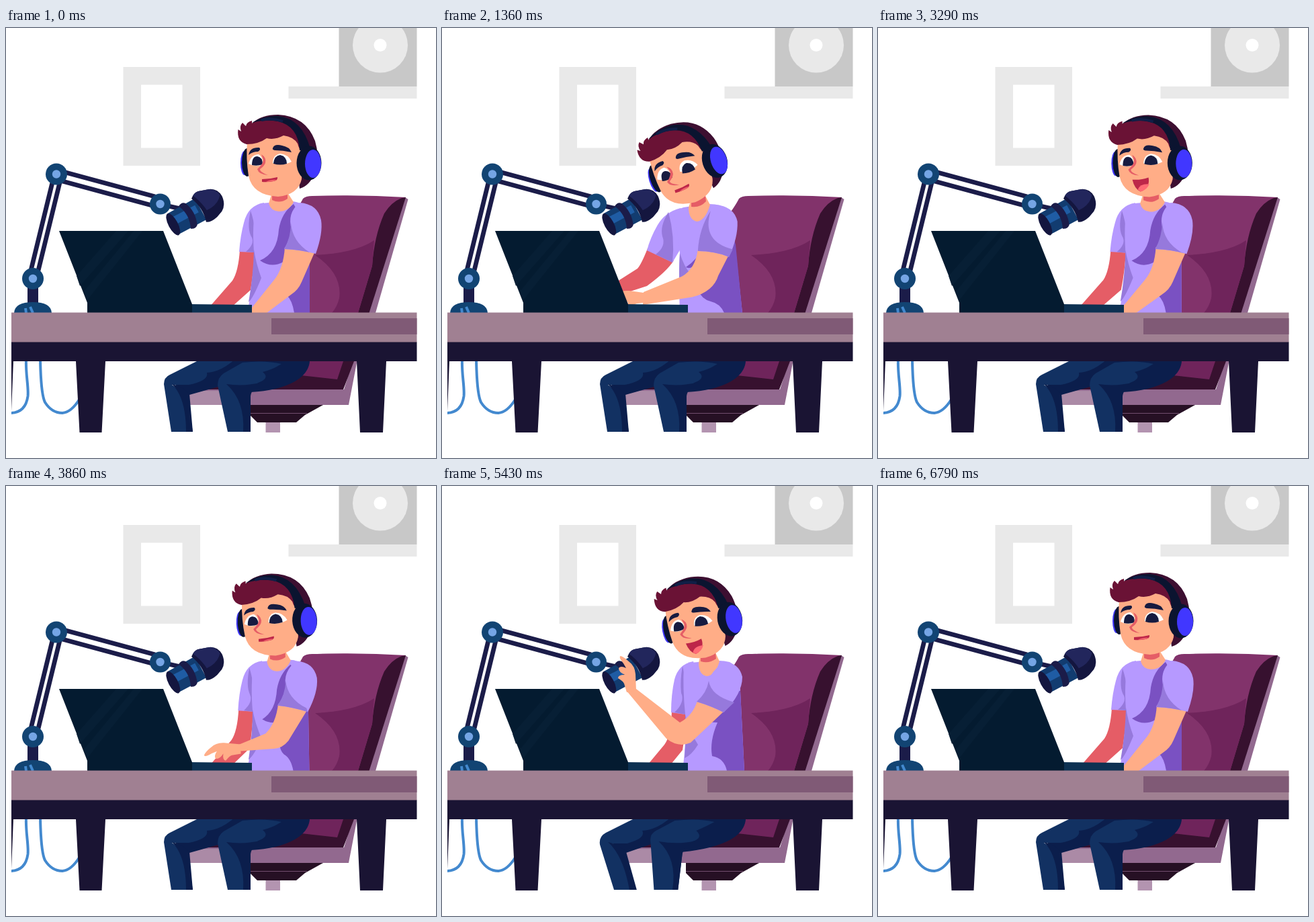
An HTML page that plays this animation: 640 by 640 pixels, repeating every 7.21 s.

```html
<!DOCTYPE html>
<html lang="en">
<head>
<meta charset="utf-8">
<title>Podcast host</title>
<style>
html, body { margin: 0; width: 100%; height: 100%; overflow: hidden; background: #fff; }
svg { display: block; width: 100vw; height: 100vh; }
</style>
</head>
<body>
<svg viewBox="0 0 640 640">
  <clipPath id="room"><path d="M8 0H611.500V640H8Z"/></clipPath>
  <g clip-path="url(#room)">
    <!-- wall -->
    <g fill="#e9e9e9">
      <path fill-rule="evenodd" d="M174.500 58H289V205H174.500ZM201 84.500V178.500H262.500V84.500Z"/>
      <path d="M420.500 87H612V105H420.500Z"/>
      <path fill="#c8c8c8" d="M495.500 0H612V87H495.500Z"/>
      <circle cx="557" cy="25.500" r="41"/>
      <circle cx="557" cy="25.500" r="9.500" fill="#fff"/>
    </g>

    <!-- chair -->
    <path fill="#92698f" d="M594 252L598.500 255L550 424H530Z"/>
    <path fill="#37112f" d="M560 252L595 252L540.500 424H510Z"/>
    <path fill="#82336b" d="M420 424L418 290Q436 266 442 254Q446 250 456 250Q525 248 595 252Q577 254 563 276Q548 310 545 354L524 424Z"/>
    <path fill="#6f245b" d="M548 316Q520 335 460 338Q501 366 496 402Q493 415 485 424H524L545 354Z"/>
    <path fill="#92698f" d="M280 538H503L516 496H522.500L510 561H268Z"/>
    <path fill="#ab8aa6" d="M272 540H330V561H268Z"/>
    <path fill="#37112f" d="M300 496H518L502 538H290Z"/>
    <path fill="#6f245b" d="M430 516L493 523L502 496H440Z"/>
    <path fill="#261024" d="M363 561H472L445 576L432 587H374L363 576Z"/>
    <path fill="none" stroke="#92698f" stroke-width=".7" d="M363 573.500H448"/>
    <path fill="#b394b0" d="M386.500 587H408V602H386.500Z"/>

    <!-- cables -->
    <g fill="none" stroke="#4389cf" stroke-width="4">
      <path d="M30 494C29 515 34 535 32.500 548Q29 573 6 573"/>
      <path d="M51 494Q52 545 58 557Q68 573 84 573Q97 572 109 553"/>
    </g>

    <!-- microphone -->
    <g fill="none" stroke="#1b1c49" stroke-width="6.800">
      <path d="M87 214.500L222 251M84 228L217 264M69 230L37 361M80 230L48 361M242 265L264 270"/>
      <path stroke-width="16" d="M40 384V410"/>
    </g>
    <g fill="#124473">
      <path d="M12 424Q13 408 40 408Q67 408 68 424Z"/>
      <circle cx="75" cy="217.500" r="16"/>
      <circle cx="229.500" cy="262" r="15.500"/>
      <circle cx="40" cy="373" r="16"/>
    </g>
    <g fill="#75a5e5">
      <circle cx="75" cy="217.500" r="6.200"/>
      <circle cx="229.500" cy="262" r="6.200"/>
      <circle cx="40" cy="373" r="6.200"/>
    </g>
    <path fill="none" stroke="#4389cf" stroke-width="4" d="M30 424L29 417M40 424L36 415"/>
    <g transform="translate(281 274) rotate(-28)">
      <path fill="#123c70" d="M-37 -17L10 -18V18L-37 18Z"/>
      <path fill="#1f5ca4" d="M-37 -9H5V3H-37Z"/>
      <path fill="#1b1c49" d="M-17 -19Q-10 -23 -6 -18Q2 0 -6 19Q-11 23 -17 19Q-8 0 -17 -19Z"/>
      <path fill="#14163f" d="M5 -20Q12 -26 19 -25L32 -21Q46 -17 47 -2Q46 12 36 18L26 22Q14 25 8 21Q14 0 5 -20Z"/>
      <path fill="#22265c" d="M9 -23Q14 -26 19 -25L32 -21Q43 -18 45 -5Q36 7 17 6Q16 -8 9 -23Z"/>
      <ellipse cx="-37" cy="1" rx="7" ry="18" fill="#14163f"/>
    </g>

    <g id="legs"></g>
    <g id="person"></g>

    <g id="head">
      <ellipse cx="355" cy="201" rx="6" ry="18" fill="#4137ff"/>
      <ellipse cx="359" cy="200" rx="8" ry="21" fill="#0b1430"/>
      <path fill="#3d0f31" d="M366 142Q380 129 405 129Q446 131 460 168Q467 190 460 215Q452 235 437 239L430 180Z"/>
      <path fill="#ffad87" d="M359 168Q357 195 361 220Q367 249 405 251Q435 248 440 225L442 180Q430 150 400 152Q375 150 359 168Z"/>
      <path fill="#6a1235" d="M358 173Q343 169 345.500 151L350 154Q347 146 352 141L357 146Q358 140 366 138V142Q385 131 408 133Q432 138 440 160L441 185Q436 180 434 172Q428 162 413 160Q400 167 388 164Q376 173 358 173Z"/>
      <path fill="#0b1430" d="M366 141Q384 130 405 131Q441 135 453 180L437 182Q435 146 405 139Q386 135 366 141Z"/>
      <path fill="none" stroke="#101f47" stroke-width="4" d="M380 137Q396 133 412 139"/>
      <ellipse cx="451" cy="201" rx="18.500" ry="25.500" fill="#0b1430"/>
      <ellipse cx="457" cy="202" rx="12" ry="21" fill="#4137ff"/>
      <g fill="#fff">
        <path d="M361 202Q365 188 376 188Q383 192 382 203Q372 208 361 202Z"/>
        <path d="M397 201Q397 189 408 187Q420 188 425 199Q412 206 397 201Z"/>
      </g>
      <g fill="#171b40">
        <g id="pupils">
          <path d="M366 204Q366 191 374 191Q382 192 382 203Q374 206 366 204Z"/>
          <path d="M398 202Q399 190 408 189Q418 191 418 202Q408 205 398 202Z"/>
        </g>
        <path d="M361 189Q363 177 377 178Q380 181 375 184Q367 184 361 189Z"/>
        <path d="M397 179Q399 172 411 175Q422 177 425 185Q412 182 400 182Q396 181 397 179Z"/>
      </g>
      <path fill="#e55d66" d="M380 188Q388 193 386 201Q384 206 378 210Q377 214 390 219Q376 218 374 210Q383 202 383 196Z"/>
      <g id="closed">
        <path fill="#bd2649" d="M381 225Q393 225 404 222Q405 227 398 228Q389 230 381 229Z"/>
        <path fill="#f0626c" d="M387 229Q394 225 403 226Q399 229 387 229Z"/>
      </g>
      <g id="open">
        <path fill="#bd2649" d="M380 225Q393 226 404 222Q407 237 392 243Q383 239 380 225Z"/>
        <path fill="#ff6b75" d="M388 240Q391 231 405 232Q402 240 392 243Z"/>
      </g>
    </g>

    <!-- laptop -->
    <path fill="#0d3152" d="M270 411L366 412V424H270Z"/>
    <path fill="#041b30" d="M79 302H234L277 411V424H121V409Z"/>
    <path fill="#071f35" d="M164 302H182L110 384L105 369ZM190 302H203L121 405L116 392Z"/>

    <!-- desk -->
    <path fill="#a08092" d="M8 423.500H612V468H8Z"/>
    <path fill="#805a76" d="M395 432H612V456H395Z"/>
    <path fill="#1a1433" d="M8 467.500H612V496H8ZM104 496H148L142.500 602H109.500ZM522 496H566L561 602H527ZM8 496H11L8 570Z"/>
  </g>
</svg>
<script>
const LOOP = 7210, STEP = 1000 / 14;
const SKIN = '#ffad87', RED = '#e55d66', LILAC = '#b699ff', SHADE = '#9679dc', VIOLET = '#7a51c2';
const NAVY = '#0b1e4c', DENIM = '#123162';

// Each part: fill and one outline per pose. The typing pose falls back to lean.
const body = [
  [RED, { // far arm
    rest: 'M348 330L370 330Q369 360 364 390L336 415L303 415L337 376Q346 362 348 330',
    lean: 'M306 328L345 346Q335 362 305 384L268 396L258 379L291 358Q297 351 306 328',
    hold: 'M342 334L363 338Q362 370 358 393L340 415L306 415L331 385Q341 372 342 334' }],
  [LILAC, { // far sleeve
    rest: 'M384 260Q360 264 354 290Q349 308 347 333L369 334L392 300Z',
    lean: 'M355 268Q332 274 321 293Q310 312 305 331L343 349L372 300Z',
    hold: 'M374 261Q352 265 346 288Q341 310 341 337L362 340L385 300Z' }],
  [SHADE, {
    rest: 'M364 272Q374 300 369 334L357 333Q370 322 366 312Q358 300 364 272',
    lean: 'M337 274Q347 310 343 349L318 337Q334 325 328 310Q324 295 337 274',
    hold: 'M358 268Q366 300 362 340L346 337Q362 322 356 308Q354 290 358 268' }],
  [LILAC, { // torso
    rest: 'M392 260Q378 260 372 268Q366 290 369 334Q373 370 358 424L452 424L452 330Q455 270 440 262Q432 258 424 258Z',
    lean: 'M366 266Q352 267 346 276Q350 300 354 335Q352 370 354 424L447 424L436 322Q432 275 414 264Q406 262 398 262Z',
    hold: 'M382 262Q368 262 360 268Q358 300 362 340Q364 380 358 424L450 424L444 305Q445 270 428 262Q420 260 412 260Z' }],
  [VIOLET, {
    rest: 'M452 330L452 424L429 424Q426 405 418 398Q402 390 413 348Q395 358 378 346Q404 335 406 300Q410 275 428 262L450 300Z',
    lean: 'M437 322L447 424L420 424Q414 410 400 407Q372 400 380 350Q370 360 363 356Q380 345 388 326Q394 300 406 280L430 300Z',
    hold: 'M444 305L450 424L424 424Q420 405 402 402Q398 380 410 352Q400 352 390 350Q395 335 396 310Q400 290 412 275L430 300Z' }],
  [SHADE, {
    rest: 'M369 330Q368 370 361 408Q368 402 380 372Q372 350 369 330',
    lean: 'M354 335Q352 370 354 388Q364 378 370 366Q360 355 354 335',
    hold: 'M362 340Q364 370 361 405Q372 400 381 385Q368 365 362 340' }],
  [SKIN, { // neck
    rest: 'M396 245L419 245L428 259Q421 273 406 273Q394 272 391 261Z',
    lean: 'M371 255L392 250L399 263Q392 287 379 288Q367 285 367 267Z',
    hold: 'M385 250L407 248L413 261Q407 282 394 283Q382 281 382 263Z' }],
  [RED, {
    rest: 'M396 245L419 245L419 254Q408 262 396 256Z',
    lean: 'M371 255L392 250L393 258Q384 268 371 266Z',
    hold: 'M385 250L407 248L408 257Q397 265 385 261Z' }],
  [SKIN, { // near arm
    rest: 'M415 326Q413 358 399 375L363 420L380 430L424 397Q435 390 440 378L461 330',
    lean: 'M378 328Q374 356 355 367L300 391L299 412L375 395Q400 390 407 374L420 336',
    type: 'M382 331Q378 360 358 371L300 394L299 412L371 403Q406 393 413 366L430 338',
    hold: 'M380 320Q373 342 354 352L289 302L274 304L334 376Q352 390 370 382L420 335' }],
  [LILAC, { // near sleeve
    rest: 'M437 260Q418 275 425 300Q421 318 414 329Q438 330 461 336Q472 305 469 286Q464 262 437 260',
    lean: 'M406 263Q386 280 393 300Q386 318 378 330Q402 332 420 340Q440 312 439 288Q434 265 406 263',
    type: 'M406 263Q386 280 394 300Q388 318 382 333Q406 332 430 341Q441 312 440 288Q435 265 406 263',
    hold: 'M420 262Q394 280 396 300Q390 312 379 321Q402 328 419 337Q447 310 447 284Q442 263 420 262' }],
  [SHADE, {
    rest: 'M424 290Q426 318 452 334L461 336Q438 330 414 329Q424 312 424 290',
    lean: 'M400 272Q384 316 430 326L420 340Q402 332 378 330Q382 298 400 272',
    type: 'M400 272Q386 318 434 331L430 341Q406 332 382 333Q383 298 400 272',
    hold: 'M397 290Q400 312 435 322L419 337Q402 328 379 321Q394 308 397 290' }],
];
const legs = [
  [NAVY, { // thighs
    rest: 'M300 490L452 490Q454 512 430 526Q405 540 364 542L330 530L273 546L242 524Z',
    out: 'M300 490L452 490Q454 512 430 526Q405 540 357 545L325 528L274 546L242 524Z' }],
  [DENIM, { // far leg
    rest: 'M292 492L342 492Q320 512 299 513Q302 525 272 531L247 531Q270 545 278 601L246 601L235 530Q235 520 244 516Z',
    out: 'M292 492L342 492Q320 512 298 513Q304 524 276 532L250 532Q272 548 290 601L257 601L235 534Q233 522 244 516Z' }],
  [NAVY, {
    rest: 'M247 530Q264 534 273 544L278 601L268 601Q268 550 247 530',
    out: 'M247 530Q264 534 274 544L291 601L280 601Q270 550 247 530' }],
  [DENIM, { // near leg
    rest: 'M352 498Q385 494 410 500Q398 508 382 512Q392 520 380 526Q364 532 364 545L364 601L330 601L315 532Q315 520 324 514Z',
    out: 'M346 498Q380 494 405 500Q390 508 378 513Q388 522 376 528Q358 534 357 548L350 601L314 601L310 530Q308 518 318 513Z' }],
  [NAVY, {
    rest: 'M328 530Q355 534 382 527Q366 534 364 548L364 601L353 601Q356 555 328 530',
    out: 'M322 529Q352 534 378 528Q359 536 357 548L350 601L342 601Q350 555 322 529' }],
];
const handShape = 'M289 305L288 280Q287 268 279 262Q272 255 266 253Q262 254 270 264L274 271Q266 267 263 271Q263 277 272 281Q262 281 262 286Q270 291 271 294L275 307Z';
const headPose = {
  rest: 'translate(0 0) rotate(0 457 202)',
  lean: 'translate(-45 -5) rotate(-17.3 457 202)',
  hold: 'translate(-22.500 -4) rotate(-10.4 457 202)' };
const handPose = {
  rest: 'translate(91 124) rotate(-115 281 303)',
  lean: 'translate(19 99) rotate(-80 281 303)',
  hold: 'translate(0 0) rotate(0 281 303)' };
const gaze = { rest: 'translate(0 0)', lean: 'translate(1.5 2.5)', hold: 'translate(0 0)' };

const bodyKeys = [[0, 'rest'], [825, 'lean'], [860, 'lean'], [1680, 'type'], [1714, 'type'], [2500, 'lean'],
  [3430, 'rest'], [3500, 'rest'], [4430, 'hold'], [5930, 'hold'], [6800, 'rest'], [LOOP, 'rest']];
const legKeys = [[0, 'rest'], [4715, 'rest'], [5645, 'out'], [5930, 'out'], [6800, 'rest'], [LOOP, 'rest']];
const speech = [[930, 1140], [1430, 1640], [1790, 2000], [2280, 3570], [4570, 4790], [5000, 5570], [5790, 6000]];

const byId = id => document.getElementById(id);
function addPath(parent, fill, d) {
  const path = document.createElementNS('http://www.w3.org/2000/svg', 'path');
  path.setAttribute('fill', fill);
  if (d) path.setAttribute('d', d);
  return parent.appendChild(path);
}

const number = /-?\d+(\.\d+)?/g;
function mix(a, b, k) {
  const ends = b.match(number);
  let i = 0;
  return a.replace(number, n => (+n + (ends[i++] - n) * k).toFixed(2));
}

// Solves cubic-bezier(.5, 0, .5, 1).
function ease(x) {
  let lo = 0, hi = 1;
  for (let i = 0; i < 20; i++) {
    const s = (lo + hi) / 2;
    if (1.5 * s * (1 - s) + s ** 3 < x) lo = s; else hi = s;
  }
  return lo * lo * (3 - 2 * lo);
}

function poseAt(keys, t) {
  const i = Math.max(1, keys.findIndex(key => key[0] > t));
  const [start, from] = keys[i - 1], [end, to] = keys[i];
  const k = ease((t - start) / (end - start));
  return poses => mix(poses[from] || poses.lean, poses[to] || poses.lean, k);
}

const track = (parent, parts) => parts.map(([fill, poses]) => [addPath(parent, fill), 'd', poses]);
const legTracks = track(byId('legs'), legs);
const bodyTracks = track(byId('person'), body);
bodyTracks.push([byId('head'), 'transform', headPose], [byId('pupils'), 'transform', gaze],
  [addPath(byId('person'), SKIN, handShape), 'transform', handPose]);

function apply(tracks, pose) {
  for (const [node, name, poses] of tracks) node.setAttribute(name, pose(poses));
}

function draw(now) {
  const t = Math.min(95, Math.floor((now % LOOP + 5) / STEP)) * STEP;
  apply(bodyTracks, poseAt(bodyKeys, t));
  apply(legTracks, poseAt(legKeys, t));
  const talking = speech.some(([from, to]) => t >= from - 5 && t < to - 5);
  byId('open').style.display = talking ? '' : 'none';
  byId('closed').style.display = talking ? 'none' : '';
}

const began = performance.now();
function tick() {
  draw(performance.now() - began);
  requestAnimationFrame(tick);
}
tick();
</script>
</body>
</html>
```
